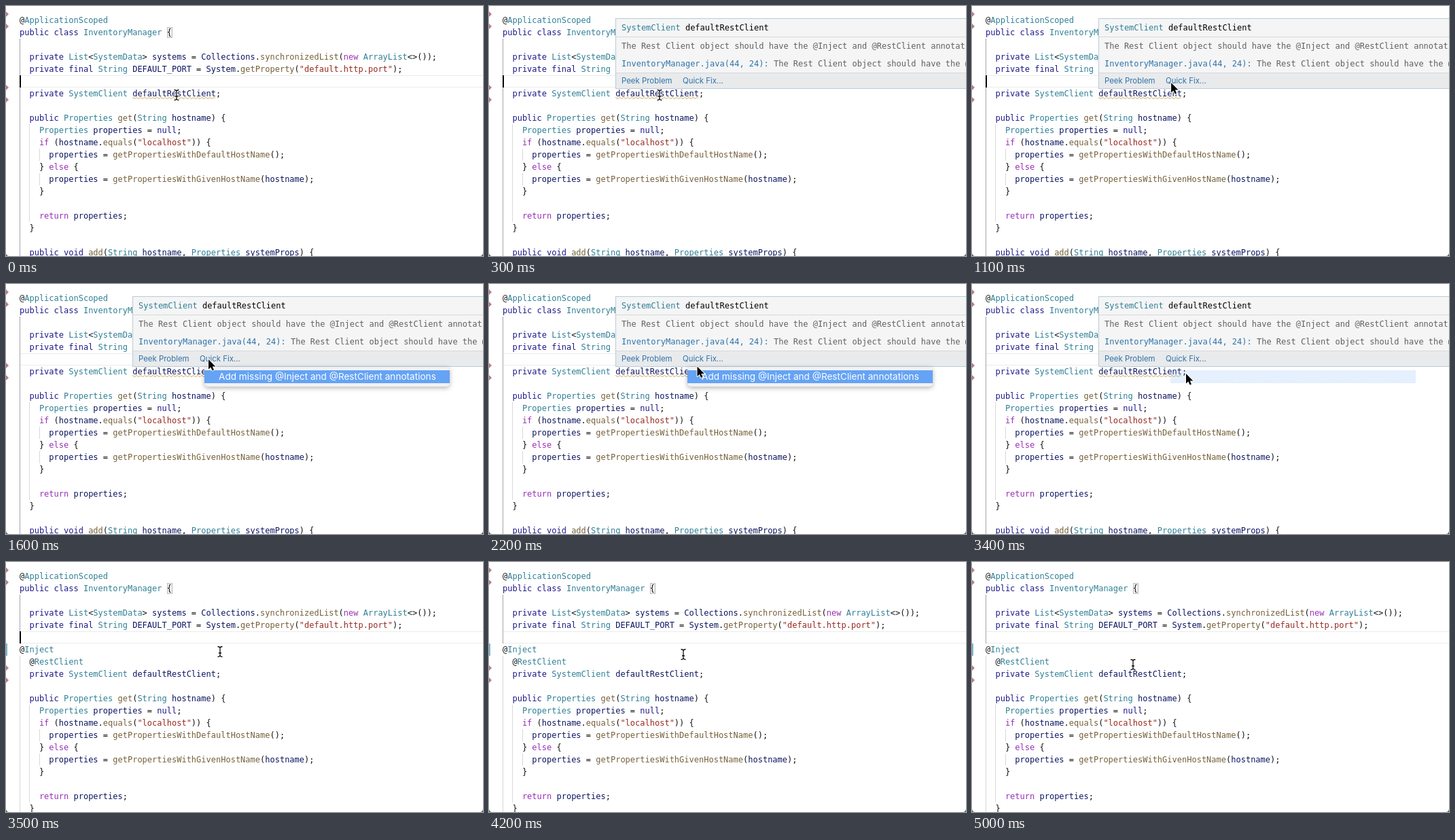
Animation of 702 by 368 pixels, one loop 5.1 s. Source, as an HTML page with a canvas:

```html
<!DOCTYPE html>
<html lang="en">
<head>
<meta charset="utf-8">
<title>Quick fix in a code editor</title>
<style>
  html, body { margin: 0; width: 100%; height: 100%; overflow: hidden; background: #fff; }
  canvas { display: block; }
</style>
</head>
<body>
<canvas id="stage" width="702" height="368"></canvas>
<script>
const ctx = document.getElementById('stage').getContext('2d');
const W = 702, H = 368, LOOP = 5100;
const LEFT = 20, TOP = 12, LINE = 18;
const MONO = '12px "DejaVu Sans Mono", monospace';
const ui = size => `${size}px Inter, sans-serif`;

const HOVER_AT = 200, MENU_AT = 1500, FADE_AT = 3200, EDIT_AT = 3500;

const COLORS = {
  keyword: '#1c1889', control: '#9a2fb5', type: '#2f7f95', call: '#75603a',
  string: '#98291f', name: '#0c1560', plain: '#111'
};
const KEYWORDS = /^(public|class|private|final|null|void)$/;
const CONTROL = /^(if|else|return|new)$/;
const TYPES = /^(List|ArrayList|String|Properties|System(Data|Client)|InventoryManager|ApplicationScoped|Inject|RestClient)$/;

const head = `@ApplicationScoped
public class InventoryManager {

  private List<SystemData> systems = Collections.synchronizedList(new ArrayList<>());
  private final String DEFAULT_PORT = System.getProperty("default.http.port");

`.split('\n').slice(0, -1);
const added = ['@Inject', '  @RestClient'];
const tail = `  private SystemClient defaultRestClient;

  public Properties get(String hostname) {
    Properties properties = null;
    if (hostname.equals("localhost")) {
      properties = getPropertiesWithDefaultHostName();
    } else {
      properties = getPropertiesWithGivenHostName(hostname);
    }

    return properties;
  }

  public void add(String hostname, Properties systemProps) {`.split('\n');

// Pointer positions: time, x, y
const PATH = [
  [0, 251, 131], [700, 251, 131], [1200, 298, 111], [1900, 298, 111],
  [2500, 315, 132], [3500, 315, 132], [3600, 315, 136], [3800, 300, 136],
  [3900, 300, 136], [4200, 286, 136], [4500, 262, 143], [4800, 237, 151], [LOOP, 237, 151]
];

function rect(x, y, w, h, color) {
  ctx.fillStyle = color;
  ctx.fillRect(x, y, w, h);
}

function text(str, x, y, color, font = MONO) {
  ctx.font = font;
  ctx.fillStyle = color;
  ctx.fillText(str, x, y);
}

function colorOf(token, next) {
  if (token[0] === '"') return COLORS.string;
  if (KEYWORDS.test(token)) return COLORS.keyword;
  if (CONTROL.test(token)) return COLORS.control;
  if (TYPES.test(token)) return COLORS.type;
  if (!/^\w/.test(token)) return COLORS.plain;
  return next === '(' ? COLORS.call : COLORS.name;
}

function codeLine(line, row, charWidth) {
  for (const match of line.matchAll(/"[^"]*"|\w+|[^\w\s"]+/g)) {
    const token = match[0], next = line[match.index + token.length];
    text(token, LEFT + match.index * charWidth, TOP + row * LINE + 13, colorOf(token, next));
  }
}

function guide(column, fromRow, toRow, charWidth, color = '#d8d8d8') {
  rect(Math.round(LEFT + column * charWidth), TOP + fromRow * LINE, 1, (toRow - fromRow) * LINE, color);
}

function gutterMark(y) {
  ctx.fillStyle = '#b97b8b';
  ctx.beginPath();
  ctx.moveTo(0, y - 4);
  ctx.lineTo(4, y);
  ctx.lineTo(0, y + 4);
  ctx.fill();
}

function squiggle(x, y, width) {
  ctx.beginPath();
  for (let i = 0; i <= width; i++) ctx.lineTo(x + i, y - Math.cos(i * Math.PI / 3));
  ctx.strokeStyle = '#cfa850';
  ctx.lineWidth = 1;
  ctx.stroke();
}

function caretVisible(t) {
  if (t >= MENU_AT && t < EDIT_AT) return false;
  const since = t < MENU_AT ? t : t - EDIT_AT;
  return since % 1000 < 500;
}

function drawEditor(t) {
  const edited = t >= EDIT_AT, shift = edited ? 2 : 0;
  ctx.font = MONO;
  const cw = ctx.measureText('M').width;

  rect(LEFT, 102, W, 1, '#ececec');
  rect(LEFT, 119, W, 1, '#ececec');

  guide(0, 2, edited ? 6 : 20, cw, '#a5a5a5');
  if (edited) guide(0, 7, 20, cw);
  guide(2, 9 + shift, 17 + shift, cw);
  guide(4, 11 + shift, 12 + shift, cw);
  guide(4, 13 + shift, 14 + shift, cw);

  const brace = Math.round(LEFT + 30 * cw);
  rect(brace, 31, 8, 16, '#b9b9b9');
  rect(brace + 1, 32, 6, 14, '#f5f5f5');

  const lines = [...head, ...(edited ? added : []), ...tail];
  lines.forEach((line, row) => codeLine(line, row, cw));
  if (!edited) squiggle(LEFT + 23 * cw, 135.5, 17 * cw);

  [12, 30, 120 + shift * LINE, 138 + shift * LINE].forEach(gutterMark);
  if (edited) rect(0, 120, 2, 18, '#83b2cc');
  if (caretVisible(t)) rect(LEFT, 102, 2, 18, '#000');
}

function drawHover() {
  const x = 186, y = 18, h = 104, grey = '#616161', link = '#2f73a8';
  rect(x, y, W, h, '#b9cbd8');
  rect(x + 1, y + 1, W, h - 2, '#f5f5f6');
  rect(x + 1, 45, W, 1, '#d5d8dc');
  rect(x + 1, 98, W, 23, '#e9eaec');
  rect(x + 1, 98, W, 1, '#d5d8dc');

  const problem = 'The Rest Client object should have the @Inject and @RestClient annotations';
  ctx.font = MONO;
  const cw = ctx.measureText('M').width;
  text('SystemClient', 195, 36, COLORS.type);
  text('defaultRestClient', 195 + 13 * cw, 36, '#000');
  text(problem, 195, 63, grey);
  text('InventoryManager.java(44, 24):', 195, 89, link);
  text(problem, 195 + 31 * cw, 89, grey);
  text('Peek Problem', 195, 114, link, ui(11.4));
  text('Quick Fix...', 285, 114, link, ui(11.4));
}

function drawMenu(t) {
  const fading = t >= FADE_AT;
  ctx.save();
  if (fading) {
    ctx.globalAlpha = Math.max(0, 1 - (t - FADE_AT + 100) / 360);
  } else {
    ctx.shadowColor = 'rgba(0,0,0,.3)';
    ctx.shadowBlur = 7;
    ctx.shadowOffsetY = 2;
    ctx.fillStyle = '#f1f2f4';
    ctx.beginPath();
    ctx.roundRect(292, 122, 361, 29, 5);
    ctx.fill();
    ctx.shadowColor = 'transparent';
  }
  rect(292, 127, 361, 19, '#65a3f5');
  text('Add missing @Inject and @RestClient annotations', 313, 141, '#fff', ui(13.6));
  ctx.restore();
}

function pointerAt(t) {
  const i = PATH.findIndex(p => p[0] > t);
  const [t0, x0, y0] = PATH[i - 1], [t1, x1, y1] = PATH[i];
  const k = (t - t0) / (t1 - t0), ease = k * k * (3 - 2 * k);
  return [x0 + (x1 - x0) * ease, y0 + (y1 - y0) * ease];
}

function drawPointer(t) {
  const [x, y] = pointerAt(t);
  const beam = t < 1000 || t >= EDIT_AT;
  const shape = new Path2D(beam
    ? 'M-3.5-7.5Q0-7.5 0-5Q0-7.5 3.5-7.5M0-5V5M-3.5 7.5Q0 7.5 0 5Q0 7.5 3.5 7.5M-2 2H2'
    : 'M0 0V14.5L3.3 11.4L5.6 16.5L8 15.4L5.8 10.5H10.4Z');
  ctx.save();
  ctx.translate(x, y);
  ctx.lineJoin = 'round';
  ctx.strokeStyle = '#fff';
  ctx.lineWidth = beam ? 3 : 2;
  ctx.stroke(shape);
  if (beam) {
    ctx.strokeStyle = '#111';
    ctx.lineWidth = 1.3;
    ctx.stroke(shape);
  } else {
    ctx.fillStyle = '#000';
    ctx.fill(shape);
  }
  ctx.restore();
}

function drawCorners() {
  ctx.fillStyle = '#555';
  for (const [x, dir] of [[0, 1], [W, -1]]) {
    ctx.beginPath();
    ctx.moveTo(x, H);
    ctx.lineTo(x, H - 5);
    ctx.quadraticCurveTo(x, H, x + 5 * dir, H);
    ctx.fill();
  }
}

function frame(now) {
  const t = Math.floor(now % LOOP / 100) * 100;
  rect(0, 0, W, H, '#fff');
  drawEditor(t);
  if (t >= HOVER_AT && t < EDIT_AT) drawHover();
  if (t >= MENU_AT && t < EDIT_AT) drawMenu(t);
  drawPointer(t);
  drawCorners();
  requestAnimationFrame(() => frame(performance.now()));
}
frame(0);
</script>
</body>
</html>
```
